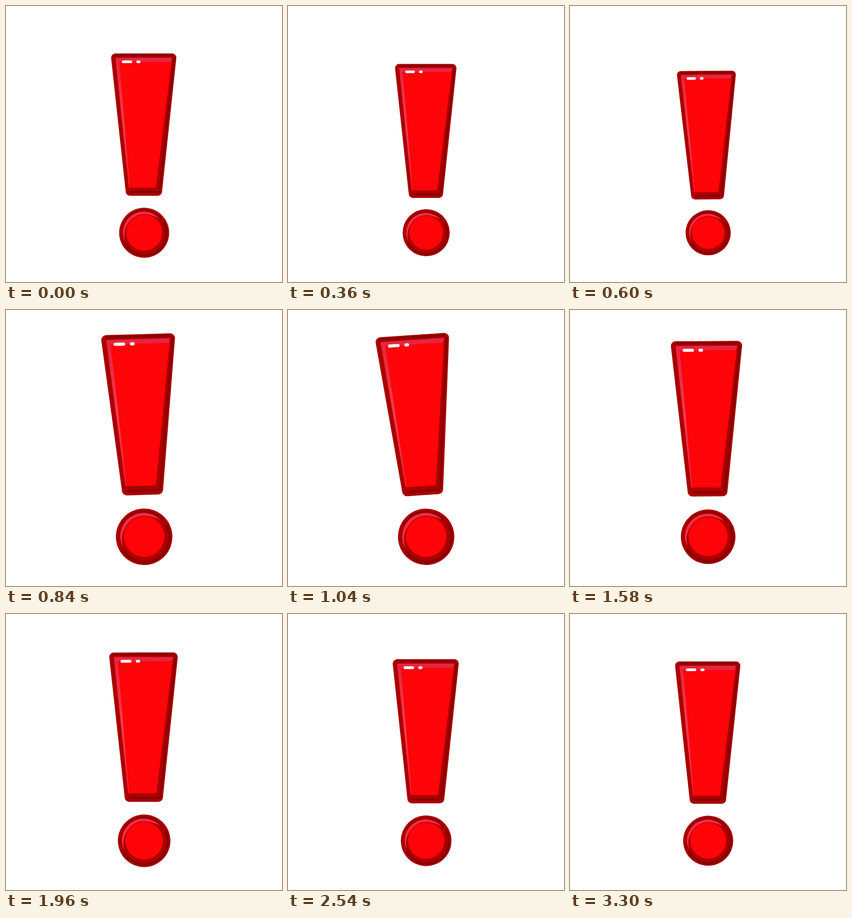
These frames come from a looping animation (512 px wide and 512 px high, 3.6 s). An HTML page:

```html
<!DOCTYPE html>
<html lang="en">
<head>
<meta charset="utf-8">
<title>Exclamation mark</title>
<style>
  html, body { margin: 0; width: 100%; height: 100%; overflow: hidden; background: #fff; }
  svg { display: block; width: 100vw; height: 100vh; }
</style>
</head>
<body>
<svg viewBox="0 0 512 512">
  <defs>
    <linearGradient id="shine" x1="0" y1="0" x2="0" y2="1">
      <stop offset="0" stop-color="#e62440"/>
      <stop offset=".5" stop-color="#f43a50"/>
      <stop offset="1" stop-color="#ee2038"/>
    </linearGradient>
  </defs>
  <g id="mark" stroke-linecap="round" stroke-linejoin="round">
    <!-- bar -->
    <path d="M203 96H308L281.5 344H230Z" fill="#aa0000" stroke="#aa0000" stroke-width="16"/>
    <path d="M204 91.500H309M312 97L285 343M232 345H282" fill="none" stroke="#8c0000" stroke-width="4"/>
    <path d="M203 96H308L306 104H211L230 337H228Z" fill="url(#shine)"/>
    <path d="M210 103.500H307L278 337H230Z" fill="#ff0408"/>
    <path d="M217.500 103.500H231.500M244.500 103.500H247" fill="none" stroke="#fff" stroke-width="5.200"/>
    <!-- dot -->
    <circle cx="256.300" cy="420.700" r="46.400" fill="#aa0000"/>
    <path d="M294 404A41 41 0 0 1 222 443" fill="none" stroke="#8c0000" stroke-width="5"/>
    <path d="M222 398A41 41 0 0 1 287 393" fill="none" stroke="#940000" stroke-width="4"/>
    <path d="M221 437A38.500 38.500 0 0 1 284 394Q257 380 236 394Q215 410 221 437Z" fill="#f02c45"/>
    <circle cx="256.300" cy="420.500" r="34.500" fill="#b80000"/>
    <circle cx="256.300" cy="420.500" r="33.200" fill="#ff0408"/>
  </g>
</svg>
<script>
  const LOOP = 3600, STEP = 20;
  const PIVOT = [256.3, 420.7];
  const mark = document.getElementById('mark');

  // Each key is [time in ms, value].
  const scaleKeys = [[220, 1], [560, 0.885], [800, 1.13], [3300, 1]];
  const tiltKeys = [
    [440, 0], [560, -1.8], [680, 3.4], [795, -5.2], [910, 5.6], [1030, -4], [1150, 3],
    [1275, -1.95], [1400, 1.55], [1520, -1.2], [1650, 0.7], [1840, -0.4], [2000, 0]
  ];

  const sine = u => (1 - Math.cos(Math.PI * u)) / 2;

  // Cubic bezier easing with handles (x1, 0) and (x2, 1).
  const bezier = (x1, x2) => u => {
    let lo = 0, hi = 1;
    for (let i = 0; i < 24; i++) {
      const p = (lo + hi) / 2, q = 1 - p;
      if (3 * q * q * p * x1 + 3 * q * p * p * x2 + p * p * p < u) lo = p;
      else hi = p;
    }
    return lo * lo * (3 - 2 * lo);
  };
  const settle = bezier(0.4, 0.35);

  function sample(keys, t, ease) {
    if (t <= keys[0][0]) return keys[0][1];
    for (let i = 1; i < keys.length; i++) {
      const [t0, a] = keys[i - 1], [t1, b] = keys[i];
      if (t < t1) return a + (b - a) * ease((t - t0) / (t1 - t0));
    }
    return keys[keys.length - 1][1];
  }

  function draw(ms) {
    const t = Math.floor((ms % LOOP) / STEP) * STEP;
    const scale = sample(scaleKeys, t, settle);
    const tilt = sample(tiltKeys, t, sine);
    const [x, y] = PIVOT;
    mark.setAttribute('transform',
      `translate(${x} ${y}) rotate(${tilt}) scale(${scale}) translate(${-x} ${-y})`);
  }

  const start = performance.now();
  function tick() {
    draw(performance.now() - start);
    requestAnimationFrame(tick);
  }
  tick();
</script>
</body>
</html>
```
